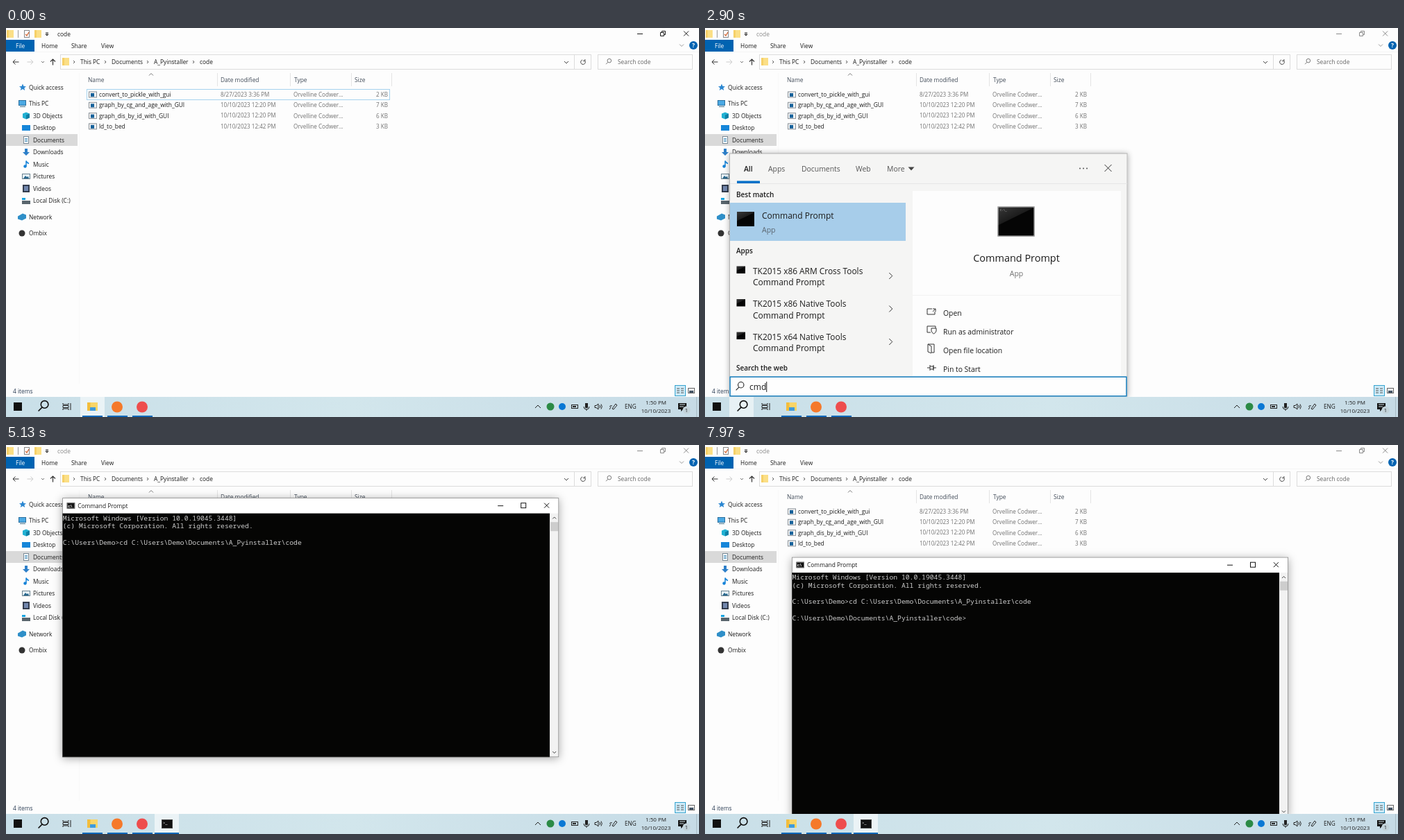
An HTML page with a canvas that plays this animation: 998 px wide and 561 px high, repeating every 8 s.

```html
<!DOCTYPE html>
<html lang="en">
<head>
<meta charset="utf-8">
<title>Opening a folder in the command prompt</title>
<style>
  html, body { margin: 0; width: 100%; height: 100%; overflow: hidden; background: #fdfdfd; }
  canvas { display: block; width: 100vw; height: 100vh; }
</style>
</head>
<body>
<canvas id="stage" width="998" height="561"></canvas>
<script>
const DURATION = 8000;
const SANS = '"Open Sans", "Noto Sans", sans-serif';
const MONO = '"Noto Sans Mono", "DejaVu Sans Mono", monospace';
const BLUE = '#0078d7', DARK = '#1c1c1c', GRAY = '#707070';
const HOME = 'C:\\Users\\Demo', FOLDER = HOME + '\\Documents\\A_Pyinstaller\\code';

// Moments of the session, in ms
const T = { hoverPath: 270, editPath: 450, hoverSearch: 1600, search: 1930, results: 2500,
  closeSearch: 3030, prompt: 3090, paste: 4600, enter: 5400, minute: 5800, drag: 6750, drop: 7380 };

const stage = document.getElementById('stage').getContext('2d');
const layer = document.createElement('canvas');
layer.width = 998;
layer.height = 561;
const layerContext = layer.getContext('2d');
let g = stage;

const clamp = v => Math.max(0, Math.min(1, v));
const progress = (t, from, to) => clamp((t - from) / (to - from));
const smooth = p => p * p * (3 - 2 * p);

function text(s, x, y, { size = 8.4, color = DARK, weight = 400, font = SANS, align = 'left' } = {}) {
  g.font = `${weight} ${size}px ${font}`;
  g.fillStyle = color;
  g.textAlign = align;
  g.fillText(s, x, y + size * 0.36);
}
function box(x, y, w, h, fill, border, width = 1) {
  if (fill) { g.fillStyle = fill; g.fillRect(x, y, w, h); }
  if (border) {
    g.strokeStyle = border;
    g.lineWidth = width;
    g.strokeRect(x + width / 2, y + width / 2, w - width, h - width);
  }
}
function dot(x, y, r, fill) {
  g.fillStyle = fill;
  g.beginPath();
  g.arc(x, y, r, 0, 7);
  g.fill();
}
// SVG path data relative to (x, y)
function path(x, y, d, color = DARK, width = 1, filled = false) {
  g.save();
  g.translate(x, y);
  g.strokeStyle = g.fillStyle = color;
  g.lineWidth = width;
  filled ? g.fill(new Path2D(d)) : g.stroke(new Path2D(d));
  g.restore();
}
const chevron = (x, y, dir, color, r = 3) => path(x, y, {
  down: `M${-r} ${-r / 2}L0 ${r / 2}L${r} ${-r / 2}`,
  up: `M${-r} ${r / 2}L0 ${-r / 2}L${r} ${r / 2}`,
  right: `M${-r / 2} ${-r}L${r / 2} 0L${-r / 2} ${r}`
}[dir], color);
const cross = (x, y, r, color) => path(x, y, `M${-r} ${-r}L${r} ${r}M${r} ${-r}L${-r} ${r}`, color);
const magnifier = (x, y, r, color, width) =>
  path(x, y, `M${-r * .4} ${r * .5}L${-r * 1.4} ${r * 1.5}M${r * 1.3} ${-r * .3}a${r} ${r} 0 1 1 ${-2 * r} 0a${r} ${r} 0 1 1 ${2 * r} 0`, color, width);
function folder(x, y, w, h, front = '#fbdf86', back = '#f6d068') {
  box(x, y, w, h, front);
  box(x, y, w * .3, h, back);
}
function windowButtons(x, y, gap, color) {
  path(x, y, 'M-4 .5H4', color);
  cross(x + gap * 2, y, 3.5, color);
}
function terminalIcon(x, y, w, h, border) {
  const shine = g.createLinearGradient(x, y, x + w * .4, y + h);
  shine.addColorStop(0, '#3a3a3a');
  shine.addColorStop(.5, '#1c1c1c');
  shine.addColorStop(.52, '#050505');
  box(x, y, w, h, shine, border);
}

const NAV = [
  ['Quick access', 33, 85.5], ['This PC', 33, 109], ['3D Objects', 39, 126.5], ['Desktop', 39, 144],
  ['Documents', 39, 161.5], ['Downloads', 39, 179], ['Music', 39, 196.5], ['Pictures', 39, 214],
  ['Videos', 39, 231.5], ['Local Disk (C:)', 39, 249], ['Network', 33, 272.5], ['Ombix', 33, 296]
];
const FILES = [
  ['convert_to_pickle_with_gui', '8/27/2023 3:36 PM', '2 KB'],
  ['graph_by_cg_and_age_with_GUI', '10/10/2023 12:20 PM', '7 KB'],
  ['graph_dis_by_id_with_GUI', '10/10/2023 12:20 PM', '6 KB'],
  ['ld_to_bed', '10/10/2023 12:42 PM', '3 KB']
];

function navIcons() {
  path(24, 85.5, 'M0-5L1.5-1.6L5-1.3L2.3 1L3.2 4.6L0 2.6L-3.2 4.6L-2.3 1L-5-1.3L-1.5-1.6Z', '#2a86d1', 1, true);
  box(18, 104, 11, 8, '#4ba9e3', '#2c6f9e');
  box(20, 113, 8, 1, '#49768f');
  path(29, 126.5, 'M-5-3L0-5L5-3V3L0 5L-5 3Z', '#21b1d3', 1, true);
  path(29, 126.5, 'M0-1L5-3V3L0 5Z', '#0d7fa5', 1, true);
  box(23, 140, 12, 8, '#1686d9');
  box(25, 156, 8, 11, '#fff', '#7b8b96');
  path(29, 161.5, 'M-2-2H2M-2 0H2M-2 2H2', '#3e8ab8');
  path(29, 179, 'M-2-5H2V0H5L0 5L-5 0H-2Z', '#2d7fc9', 1, true);
  path(29, 196.5, 'M0-5V3M0-5Q1-2 4-1', '#1683d8', 1.5);
  dot(27.5, 199.5, 2.2, '#1683d8');
  box(23, 210, 12, 8, '#e8f2f8', '#68818f');
  path(29, 214, 'M-4 3L-1-1L1 1L3 0L4 3Z', '#28678d', 1, true);
  box(24, 226, 10, 11, '#333c4d');
  box(26, 228, 6, 7, '#7186ad');
  box(23, 249, 12, 5, '#59656d');
  box(23, 245, 5, 3, '#18a4e0');
  path(23, 272.5, 'M-6-1L1-5L6-3V2L0 5L-6 3Z', '#2f8fc8', 1, true);
  dot(23, 296, 4.5, '#333');
}

function explorer(t) {
  const editing = t >= T.editPath && t < T.search;
  const active = t < T.search;
  const title = active ? DARK : '#8a8a8a';
  box(0, 0, 998, 561, '#fdfdfd');

  folder(1, 3, 10, 11);
  path(17.5, 3, 'M0 0V11', '#999');
  box(26, 3, 8, 11, '#fff', '#888');
  path(30, 9, 'M-2 0L0 2L3-3', '#d1622d', 1.3);
  folder(41, 3, 10, 11);
  path(59, 8, 'M-2-1H2M-2 1L0 3L2 1Z', DARK);
  text('code', 74, 9, { color: title });
  windowButtons(913, 8, 33.3, title);
  path(946, 8, 'M-3.5-1.5H1.5V3.5H-3.5ZM-1.5-1.5V-3.5H3.5V1.5H1.5', title);

  box(0, 17, 41, 17, '#0063b1');
  text('File', 14, 26, { color: '#fff' });
  text('Home', 51, 26);
  text('Share', 94, 26);
  text('View', 137, 26);
  chevron(973, 25, 'down', '#999');
  dot(990, 25, 6, '#0063b1');
  text('?', 990, 25, { color: '#fff', weight: 700, align: 'center' });
  box(0, 34, 998, 1, '#f5f5f5');

  path(14, 49, 'M4.5 0H-4M-.5-3.5L-4 0L-.5 3.5', '#333');
  path(35, 49, 'M-4.5 0H4M.5-3.5L4 0L.5 3.5', '#ccc');
  chevron(53, 49, 'down', '#777', 2);
  path(67.5, 49, 'M0 4.5V-4M-3.5-.5L0-4L3.5-.5', '#333', 1.2);

  const hover = progress(t, T.hoverPath, T.editPath) * (t < T.editPath);
  box(78, 38, 765, 22, '#fdfdfd', '#dcdcdc');
  if (hover) box(78, 38, 740, 22, `rgba(229,243,255,${hover})`, `rgba(150,200,240,${hover})`);
  path(818.5, 38, 'M0 0V22', '#dcdcdc');
  folder(81, 43, 10, 11);
  if (editing) {
    box(78, 38, 740, 22, null, BLUE);
    g.font = `8.4px ${SANS}`;
    box(95, 44, g.measureText(FOLDER).width + 1.5, 11, BLUE);
    text(FOLDER, 96, 49.5, { color: '#fff' });
  } else {
    [['This PC', 107], ['Documents', 152], ['A_Pyinstaller', 213], ['code', 279]].forEach(([s, x]) => {
      chevron(x - 9, 49, 'right', '#555', 2);
      text(s, x, 49);
    });
  }
  chevron(807, 49.5, 'down', '#444');
  path(831, 49, 'M2.5-2A3.3 3.3 0 1 1-1-3M2.8-4V-1.5H.2', '#444');
  box(852, 38, 137, 22, null, '#dcdcdc');
  magnifier(868, 48, 2.8, '#777', 1);
  text('Search code', 881, 49, { color: '#666' });

  box(0, 153, 103, 17, '#d9d9d9');
  navIcons();
  NAV.forEach(([s, x, y]) => text(s, x, y));
  box(105, 65, 1, 448, '#f8f8f8');

  [['Name', 118], ['Date modified', 309], ['Type', 415], ['Size', 502]]
    .forEach(([s, x]) => text(s, x, 75, { color: '#414b58' }));
  [304, 409, 497, 555].forEach(x => box(x, 65, 1, 19, '#e4e4e4'));
  chevron(209, 67, 'up', '#777');
  FILES.forEach(([name, date, size], i) => {
    const y = 96 + i * 15.3;
    box(119, y - 4.5, 12, 9, '#f4f4f4', '#8a9299');
    box(122, y - 2, 5, 5, '#17629b');
    text(name, 134, y);
    text(date, 309, y, { size: 8.05, color: GRAY });
    text('Orvelline Codwer...', 414, y, { size: 8.1, color: GRAY });
    text(size, 550, y, { size: 8.1, color: GRAY, align: 'right' });
  });
  if (t < T.editPath) box(116, 88, 437, 16, null, '#a5d2ee');

  text('4 items', 10, 524, { color: '#2c3e55' });
  box(963, 515, 16, 16, '#cdeaf7', '#36a3cf');
  path(971, 523, 'M-5-3H-1M-5 0H-1M-5 3H-1M1-3H5M1 0H5M1 3H5', '#555');
  box(982, 519, 10, 8, '#eee', '#666');
  box(984, 523, 6, 3, '#456');
}

function searchResults() {
  const semi = { size: 10, weight: 600 };
  text('Best match', 45, 240, semi);
  box(36, 252, 253, 55, '#a7cdea');
  terminalIcon(46, 265, 25, 21);
  text('Command Prompt', 82, 271, { size: 12 });
  text('App', 82, 291, { size: 10.5, color: '#5b6670' });
  text('Apps', 45, 321, semi);
  ['x86 ARM Cross', 'x86 Native', 'x64 Native'].forEach((kind, i) => {
    const y = 350.5 + i * 47.5;
    terminalIcon(45.5, y - 7, 12.5, 10.5);
    text(`TK2015 ${kind} Tools`, 69, y, { size: 11.9 });
    text('Command Prompt', 69, y + 16.5, { size: 12 });
    chevron(267.5, y + 7, 'right', '#333', 4.5);
  });
  text('Search the web', 45, 490, semi);

  box(299, 235, 300, 268, '#fdfdfd');
  box(299, 385, 300, 1, '#f2f2f2');
  terminalIcon(421.5, 257.5, 53, 43, '#c9c9c9');
  text('C:\\_', 425, 263, { size: 4, color: '#bbb', font: MONO });
  text('Command Prompt', 448.5, 332, { size: 14.45, align: 'center' });
  text('App', 448.5, 354, { size: 10.5, color: GRAY, align: 'center' });
  ['Open', 'Run as administrator', 'Open file location', 'Pin to Start']
    .forEach((s, i) => text(s, 343, 411 + i * 27.2, { size: 10.4 }));
  path(326, 409, 'M1-4H-6V4H5V0M2-4H6V0M6-4L2 0', '#333');
  path(326, 435, 'M-1 4H-6V-5H6V-2M0-2H7V2Q6 5 3.5 6Q1 5 0 2Z', '#333');
  path(326, 462, 'M-5-6H4V6H0V-3L-5-6V5L0 7', '#333');
  path(326, 490, 'M-6 0H-2M-2-4V4M-2-2H3V2H-2M3-4V4M3 0H7', '#333');
}

function searchPanel(t) {
  g.save();
  g.shadowColor = 'rgba(0,0,0,.3)';
  g.shadowBlur = 8;
  box(35, 181, 573.5, 351, '#f5f5f4');
  g.restore();
  box(35, 180.5, 573.5, 351, null, '#b4b4b4');
  box(36, 224, 572, 1, '#e6e6e6');
  text('All', 56, 203, { size: 10.4, weight: 600 });
  box(46, 220.5, 33, 3.5, '#0070c8');
  [['Apps', 91], ['Documents', 139], ['Web', 217], ['More', 262]]
    .forEach(([s, x]) => text(s, x, 203, { size: 10.4, color: '#555' }));
  path(297, 203, 'M-4.5-2.5H4.5L0 2.5Z', '#444', 1, true);
  [-5, 0, 5].forEach(dx => dot(545 + dx, 202.5, .9, '#444'));
  cross(580.5, 202, 5, '#333');
  if (t >= T.results) searchResults();
  box(35.3, 502.4, 572.4, 29.2, '#fefefe', '#0f78b8', 1.5);
  magnifier(50.5, 516, 4.2, '#222', 1.1);
  const query = 'cmd'.slice(0, Math.max(0, Math.floor((t - T.results + 200) / 90)));
  text(query, 64, 518, { size: 12 });
  box(64 + g.measureText(query).width, 510, 1, 15, '#222');
}

// Window at (0, 0), 715 x 374
function promptWindow(t) {
  g.save();
  g.shadowColor = 'rgba(0,0,0,.35)';
  g.shadowBlur = 12;
  g.shadowOffsetY = 2;
  box(0, 0, 715, 374, '#fff');
  g.restore();
  box(6.5, 7, 11.5, 8.5, '#111', '#777');
  text('c:\\', 8, 11.5, { size: 5, color: '#fff', weight: 700 });
  text('Command Prompt', 22, 11.5);
  windowButtons(631, 11, 33.2, '#111');
  box(660, 7, 8, 8, null, '#111');
  box(0, 22.4, 702, 351.6, '#050504');
  box(702, 22.4, 13, 351.6, '#f2f2f2');
  box(703, 35, 11, 13, '#cdcdcd');
  chevron(708.5, 29, 'up', '#444', 2.5);
  chevron(708.5, 367, 'down', '#444', 2.5);

  const typed = t < 4000 ? '' : t < 4080 ? 'c' : t < T.paste ? 'cd ' : 'cd ' + FOLDER;
  const lines = ['Microsoft Windows [Version 10.0.19045.3448]',
    '(c) Microsoft Corporation. All rights reserved.', '', `${HOME}>${typed}`];
  if (t >= T.enter) lines.push('', FOLDER + '>');
  const mono = { size: 9.73, font: MONO, color: '#ccc' };
  lines.forEach((s, i) => text(s, .5, 28.8 + i * 11.7, mono));
  const cursorOn = Math.floor((t - 3150) / 530) % 2 === 0;
  if (cursorOn) box(.5 + lines.at(-1).length * 5.84, 32 + (lines.length - 1) * 11.7, 5.8, 2.5, '#eee');
  box(0, 0, 715, 374, null, 'rgba(90,90,90,.7)', .8);
}

function drawLayer(draw, t, x, y, alpha, scale = 1) {
  g = layerContext;
  g.clearRect(0, 0, 998, 561);
  g.save();
  g.translate(x, y);
  draw(t);
  g.restore();
  g = stage;
  g.save();
  g.globalAlpha = alpha;
  g.translate(x + 357.5, y + 187);
  g.scale(scale, scale);
  g.drawImage(layer, -x - 357.5, -y - 187);
  g.restore();
}

function taskbar(t) {
  const shade = g.createLinearGradient(0, 0, 998, 0);
  shade.addColorStop(0, '#c9dfe8');
  shade.addColorStop(.5, '#d2e6ec');
  shade.addColorStop(1, '#c6dbe6');
  box(0, 532, 998, 29, shade);
  const glow = (x, w, a) => box(x, 532, w, 29, `rgba(255,255,255,${a})`);
  const fromTaskView = progress(t, T.hoverSearch, T.hoverSearch + 100) * (1 - progress(t, 1750, 1900));
  glow(70, 35, .3 * fromTaskView);
  glow(35, 35, .55 * progress(t, T.hoverSearch + 50, 1770) * (1 - progress(t, 3180, 3400)));
  if (t < T.search) glow(107, 35, .6);

  box(11, 540, 12, 12, '#111');
  magnifier(54, 544.5, 5.3, '#111', 1.6);
  path(87, 546, 'M-5-5V-3H3V-5M-5 5V3H3V5M-5-1.5H3V1.5H-5ZM6-5V5', '#222');
  folder(117, 540, 15, 12, '#f9d567', '#f3bd3c');
  box(121, 547, 8, 5, '#3f9bdc');
  dot(160, 546.5, 8, '#f5792a');
  dot(196, 546.5, 8, '#ee4d4d');
  [110, 146, 182].forEach(x => box(x, 559, 29, 2, '#0067b8'));

  const opened = progress(t, T.prompt, T.prompt + 200);
  if (opened) {
    glow(214, 35, .6 * opened);
    g.globalAlpha = opened;
    box(224, 540, 16, 13, '#111', '#444');
    text('>_', 226, 545, { size: 5.5, color: '#fff', font: MONO });
    box(214, 559, 35, 2, '#0067b8');
    g.globalAlpha = 1;
  }

  chevron(766, 546, 'up', '#222', 4);
  dot(784, 546, 5.5, '#2b8a45');
  dot(801, 546, 5, '#0a78d4');
  box(814, 543, 10, 6, null, '#222');
  box(816, 545, 5, 2, '#222');
  box(834, 541, 4, 7, '#222');
  path(836, 546, 'M-4 0Q-4 4 0 4Q4 4 4 0M0 4V6', '#222');
  path(852, 546, 'M-4-1.5H-2L1-4V4L-2 1.5H-4ZM3-2Q4.5 0 3 2M5-3.5Q7.5 0 5 3.5', '#222');
  path(874, 546, 'M-5 4Q-2 1-4 0Q-5-2-1-1M-1 3L4-4L6-2L1 4Z', '#222');
  text('ENG', 891, 546.5, { size: 8.2 });
  text(t < T.minute ? '1:50 PM' : '1:51 PM', 936, 540, { size: 8, align: 'center' });
  text('10/10/2023', 936, 552.5, { size: 8, align: 'center' });
  path(974, 546, 'M-6-5H6V4H1L-2 7V4H-6Z', '#111', 1, true);
  path(974, 545, 'M-4-2H4M-4 1H2', '#d2e3e9');
  dot(980, 551, 5.5, '#c3d3da');
  text('1', 980, 551, { size: 7.5, align: 'center' });
  box(994, 532, 1, 29, '#a9bcc6');
}

function render(t) {
  explorer(t);
  if (t >= T.search && t < T.closeSearch + 60) {
    const alpha = progress(t, T.search, T.search + 120) * (1 - progress(t, T.closeSearch, T.closeSearch + 60));
    drawLayer(searchPanel, t, 0, 0, alpha);
  }
  if (t >= T.prompt) {
    const opened = progress(t, T.prompt, T.prompt + 150);
    const moved = smooth(progress(t, T.drag, T.drop));
    drawLayer(promptWindow, t, 81.2 + 43.8 * moved, 76.2 + 85.5 * moved, opened, .948 + .052 * opened);
  }
  taskbar(t);
}

function tick() {
  render(performance.now() % DURATION);
  requestAnimationFrame(tick);
}
tick();
</script>
</body>
</html>
```
